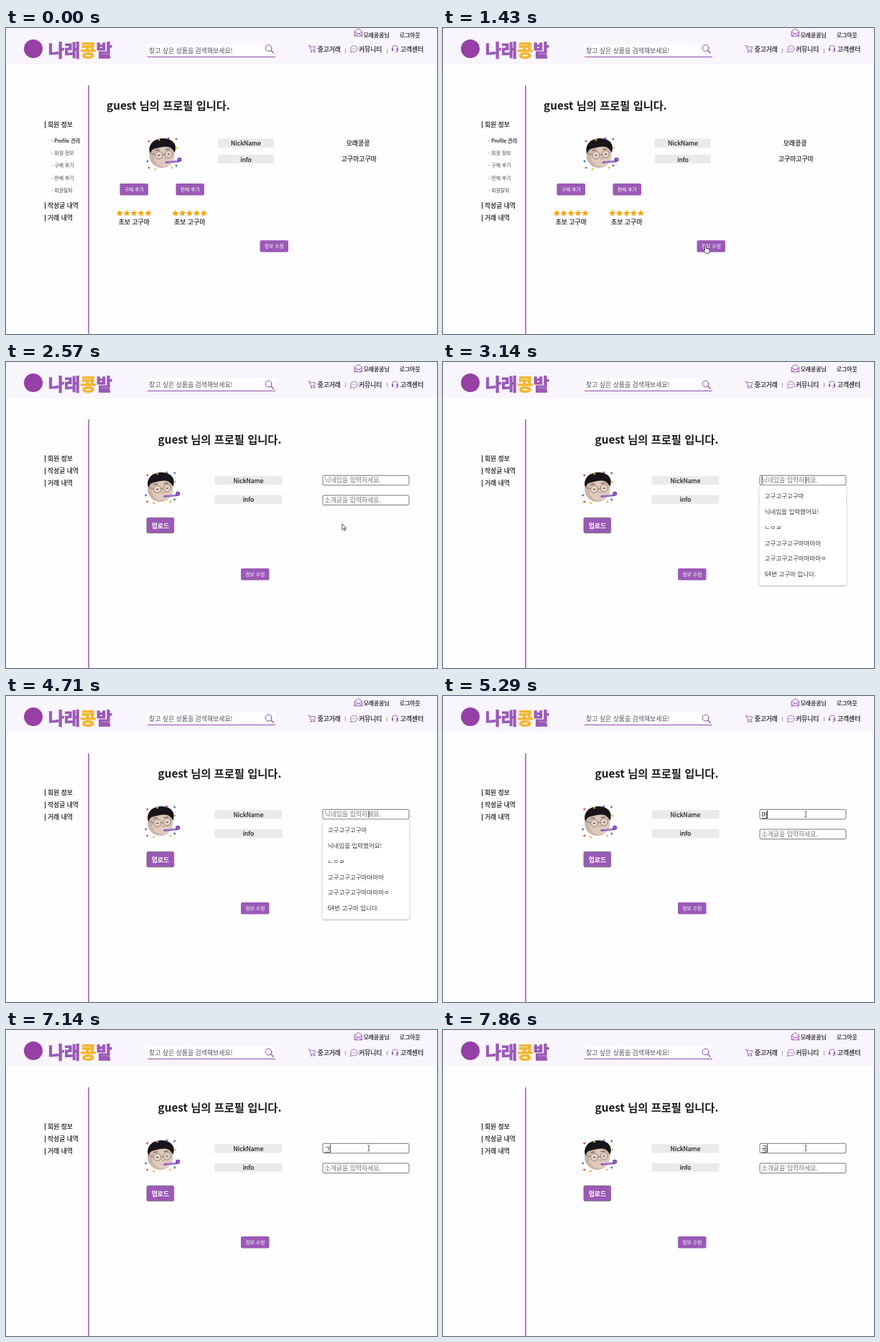
Animation, 600 px wide and 427 px high, one loop 8000 ms. Source, as an HTML page:

```html
<!DOCTYPE html>
<html lang="ko">
<head>
<meta charset="utf-8">
<style>
html, body { margin: 0; width: 100%; height: 100%; overflow: hidden; background: #fefdff; }
svg { display: block; width: 100%; height: 100%; }
text { font-family: "Noto Sans CJK KR", "Noto Sans CJK JP", "Noto Sans CJK", "Noto Sans", sans-serif; white-space: pre; }
.medium { stroke: currentColor; stroke-width: .2px; }
.heavy { stroke: currentColor; stroke-width: 1px; }
.icon { fill: none; stroke: #8e44ad; stroke-width: .75; stroke-linecap: round; stroke-linejoin: round; }
.off { display: none; }
</style>
</head>
<body>
<svg id="stage" viewBox="0 0 600 427"></svg>
<script>
const LOOP = 8000;
const PURPLE = '#9b59b6';
const INK = '#1c1b1f';

// cy is the optical middle of the line
const text = (x, cy, size, str, { fill = INK, weight = 400, anchor = 'start', look = '' } = {}) =>
  `<text x="${x}" y="${(cy + size * .37).toFixed(2)}" font-size="${size}" font-weight="${weight}" fill="${fill}" color="${fill}" text-anchor="${anchor}" class="${look}">${str}</text>`;
const rect = (x, y, w, h, fill, extra = '') =>
  `<rect x="${x}" y="${y}" width="${w}" height="${h}" fill="${fill}" ${extra}/>`;
const group = (id, body, cls = '') => `<g id="${id}" class="${cls}">${body}</g>`;
const medium = { look: 'medium' };
const middle = { anchor: 'middle', look: 'medium' };

const button = (x, y, label, id = '') =>
  rect(x, y, 39.5, 16.5, PURPLE, `rx="2" id="${id}"`) +
  text(x + 19.8, y + 8.3, 6.9, label, { fill: '#fff', anchor: 'middle' });

const label = (x, y, w, h, str, rx) =>
  rect(x, y, w, h, '#ebe9ec', `rx="${rx}"`) + text(x + w / 2, y + h / 2 + .4, 8.7, str, middle);

const menuItem = (y, str) =>
  rect(54, y - 4.6, 1, 9.6, INK) + text(58, y, 8.8, str, medium);

function star(cx, cy, r) {
  const points = Array.from({ length: 10 }, (_, i) => {
    const a = -Math.PI / 2 + i * Math.PI / 5, d = i % 2 ? r * .46 : r;
    return `${(cx + d * Math.cos(a)).toFixed(2)},${(cy + d * Math.sin(a)).toFixed(2)}`;
  });
  return `<polygon points="${points.join(' ')}" fill="#f5a50a"/>`;
}
const rating = x =>
  [0, 1, 2, 3, 4].map(i => star(x + i * 9.9, 258.5, 4.9)).join('') +
  text(x + 20, 270.3, 8.9, '초보 고구마', middle);

const CONFETTI = [
  [213, 156, '#e8b62c'], [237, 155, '#3f6fd0'], [238, 167, '#e8b62c'],
  [199, 158, '#d8453e'], [197, 186, '#3f6fd0'], [199, 195, '#d8453e'], [208, 197, '#e8b62c'],
  [237, 192, '#3f6fd0'], [231, 195, '#e8b62c'], [226, 154, '#7d48b8']
];
const avatar = dx => `<g transform="translate(${dx} 0)">
  <ellipse cx="217" cy="178" rx="17.500" ry="17" fill="#cbb4a8"/>
  <ellipse cx="220" cy="180" rx="14" ry="13.500" fill="#dfc9bd"/>
  <path d="M200.500 175C197 166 203 156 214 154.500C225 152.500 235 157 236 166C236.300 169 235.500 172 234.500 174C232 168 228 165 222 165.500C215 166 209 168 205 169C202.500 170.500 202 173 200.500 175Z" fill="#17151a"/>
  <path d="M208 171l6-1M222 169.500l6-.5" stroke="#4a3d39" stroke-width=".9"/>
  <g fill="#e4d2c6" stroke="#75695e" stroke-width=".8">
    <circle cx="213" cy="177.500" r="5.200"/><circle cx="226.500" cy="176" r="5.200"/>
    <path d="M218.200 177l3.100-.4M208 177l-7-2" fill="none"/>
  </g>
  <path d="M211.500 177.700h3M225 176.200h3" stroke="#4b3d38" stroke-width="1.300"/>
  <path d="M219 181q2 3 4 .5" fill="none" stroke="#b08a7a" stroke-width=".9"/>
  <path d="M223 187.500L240 186" stroke="#7c48c0" stroke-width="2.600" stroke-linecap="round"/>
  <path d="M225 187.200L239 185.900" stroke="#c3a1e8" stroke-width=".8"/>
  <circle cx="241.500" cy="183.800" r="3" fill="#6d3cb2"/><circle cx="241.500" cy="183.800" r="1.300" fill="#a983da"/>
  ${CONFETTI.map(([x, y, c], i) => rect(x - 1.2, y - 1.2, 2.4, 2.4, c, `transform="rotate(${i * 37} ${x} ${y})"`)).join('')}
</g>`;

const icons = group('icons', `
  <circle cx="365.500" cy="28" r="4.400" stroke-width="1"/><path d="M368.800 31.300l3.400 3.400" stroke-width="1.300"/>
  <path d="M485.500 4.700L490.500 1L495.500 4.700V11.300H485.500ZM485.500 5.600l5 3l5-3M485.500 11.300l3.700-3.300M495.500 11.300l-3.700-3.300" stroke-width=".9"/>
  <path d="M420.800 24.500h1.800l1.700 6.300h5.200l1.200-4.600h-7.700"/><circle cx="424.900" cy="33" r=".9"/><circle cx="429" cy="33" r=".9"/>
  <path d="M479.500 33.600c.8-.8 1-1.400.8-2.200a4.900 4.400 0 1 1 2.200 1.700c-1 .5-2 .6-3 .5Z"/>
  <path d="M481.500 29.300h.2M483.800 29.300h.2M486.100 29.300h.2" stroke-width="1.100"/>
  <path d="M537.700 29.300v-1a3.900 4 0 0 1 7.800 0v3.300q0 1.900-3 1.900"/>
  <path d="M537.900 28.800h.9v2.900h-.9ZM544.400 28.800h.9v2.900h-.9Z" fill="#8e44ad"/>`, 'icon');

const header = rect(0, 0, 600, 50.5, '#f8f5fd') +
  `<circle cx="38" cy="29" r="13" fill="#963fa4"/>` +
  text(58.8, 31.3, 24.2, `나래<tspan fill="#f2b731" color="#f2b731">콩</tspan>밭`, { fill: PURPLE, weight: 900, look: 'heavy' }) +
  rect(197, 22, 178, 18, '#fdfcff') + rect(197, 39.8, 178, 1, '#8e44ad') +
  text(199, 31.6, 8.9, '찾고 싶은 상품을 검색해보세요!', { fill: '#55525a' }) +
  text(497.7, 10.3, 7.8, '모래콩콩님', medium) +
  text(548, 10.3, 7.8, '로그아웃', medium) +
  group('nav',
    text(433.7, 30.2, 8.75, '중고거래', medium) +
    text(491.2, 30.2, 8.75, '커뮤니티', medium) +
    text(549, 30.2, 8.75, '고객센터', medium)) +
  rect(472, 29, .8, 6.2, '#8b8890') + rect(530, 29, .8, 6.2, '#8b8890') + icons;

const profile =
  text(140, 108.3, 15.3, 'guest 님의 프로필 입니다.', { weight: 700 }) +
  menuItem(134.7, '회원 정보') + menuItem(247.5, '작성글 내역') + menuItem(265, '거래 내역') +
  ['Profile 관리', '회원 정보', '구매 후기', '판매 후기', '회원탈퇴'].map((s, i) =>
    text(63, 157.5 + i * 17.2, 6.9, '- ' + s, i ? { fill: '#4a474e' } : medium)).join('') +
  avatar(0) +
  label(295, 154.5, 78, 12.3, 'NickName', 0) + label(295, 177, 78, 12, 'info', 0) +
  text(490, 160.5, 8.9, '모래콩콩', middle) + text(491.3, 183, 8.9, '고구마고구마', middle) +
  button(158.5, 217, '구매 후기') + button(236.5, 217, '판매 후기') +
  rating(158.3) + rating(235.7) + button(353.5, 296.3, '정보 수정', 'edit');

const inputBox = y => rect(441, y, 120, 13.6, '#fff', 'rx="2" stroke="#77747a" stroke-width="1"');

const form =
  text(297.5, 108.3, 15.3, 'guest 님의 프로필 입니다.', { weight: 700, anchor: 'middle' }) +
  menuItem(134.7, '회원 정보') + menuItem(152, '작성글 내역') + menuItem(169, '거래 내역') +
  avatar(-2.3) +
  label(290.5, 159.2, 94, 12, 'NickName', 1.5) + label(290.5, 185.7, 94, 12, 'info', 1.5) +
  rect(196, 217.3, 37.7, 21.4, PURPLE, 'rx="2" stroke="#77717c" stroke-width=".9"') +
  text(214.9, 228.3, 8.9, '업로드', { fill: '#fff', weight: 700, anchor: 'middle' }) +
  button(327, 288, '정보 수정') +
  inputBox(158.3) + inputBox(186) +
  text(443.5, 192.8, 8.9, '소개글을 입력하세요.', { fill: '#757575' }) +
  group('hint', text(443.5, 165, 8.9, '닉네임을 입력하세요.', { fill: '#757575' })) +
  `<text id="typed" x="443.500" y="168.600" font-size="8.900" fill="#111"></text>` +
  rect(443.5, 170, 8, .8, '#222', 'id="underline"') +
  rect(444, 159.3, .8, 11.4, '#111', 'id="caret"');

const suggestions = rect(440.3, 172.6, 121.4, 139, '#fff', 'rx="2.500" stroke="#dcdadf" stroke-width=".7" filter="url(#shadow)"') +
  ['고구고구고구마', '닉네임을 입력했어요!', 'ㄴㅇㄹ', '고구고구고구마마마마', '고구고구고구마마마마ㅇ', '64번 고구마 입니다.']
    .map((s, i) => text(447.8, 187.3 + i * 21.7, 8.5, s, { fill: '#3c3a40' })).join('');

const cursors =
  `<path id="arrow" class="off" d="M0 0V8.300L2 6.500L3.300 9.300L4.600 8.700L3.300 6H5.800Z" fill="#fff" stroke="#222" stroke-width=".8"/>
  <path id="hand" class="off" d="M-1 .5Q0-.5 1 .5V4.300L5.300 5.300Q6 5.700 5.800 7L5 10.800H.3L-3 6.800Q-2.500 5.600-1 7Z" fill="#fff" stroke="#222" stroke-width=".8"/>
  <path id="beam" class="off" d="M-1.600-4Q-.3-4 0-3.300Q.3-4 1.600-4M0-3.300V3.300M-1.600 4Q-.3 4 0 3.300Q.3 4 1.600 4" fill="none" stroke="#333" stroke-width=".8"/>`;

const $ = id => document.getElementById(id);
$('stage').innerHTML =
  `<defs><filter id="shadow" x="-10%" y="-10%" width="120%" height="120%"><feDropShadow dx="0" dy="1" stdDeviation="1" flood-opacity=".25"/></filter></defs>` +
  rect(0, 0, 600, 427, '#fefdff') + header + rect(114.3, 80, 1.5, 347, PURPLE) +
  group('profile', profile) + group('form', form) + group('suggestions', suggestions) + cursors;

// time, cursor shape, x, y
const POINTER = [
  [0, ''], [430, 'arrow', 565, 324], [570, 'arrow', 515, 314], [710, 'arrow', 458, 300],
  [860, 'arrow', 398, 286], [1000, 'arrow', 350, 282], [1140, 'arrow', 336, 289],
  [1290, 'arrow', 346, 298], [1430, 'hand', 365.5, 303.5], [1570, 'hand', 367, 305.5],
  [1710, 'hand', 366, 304], [2290, 'arrow', 408, 290], [2430, 'arrow', 433.5, 268.7],
  [2570, 'arrow', 468, 226], [2710, 'arrow', 495, 184], [2860, 'beam', 505, 165]
];
// time, typed text, caret shown, suggestions shown
const FIELD = [
  [0, '', 0, 0], [3000, '', 1, 0], [3140, '', 1, 1], [3570, '', 0, 1], [4140, '', 1, 1], [4710, '', 0, 1],
  [5000, 'ㅁ', 1, 1], [5150, 'ㅁ', 1, 0], [5290, '머', 1, 0], [5860, '머', 0, 0],
  [6290, 'ㅁ', 1, 0], [6430, '', 0, 0], [6570, '', 1, 0],
  [7140, 'ㄱ', 1, 0], [7290, '고', 1, 1], [7860, '곡', 1, 0]
];
const FORM_OPENS = 2570;

const at = (table, t) => table.findLast(row => row[0] <= t);
const show = (id, on) => $(id).classList.toggle('off', !on);
const move = (id, x, y) => $(id).setAttribute('transform', `translate(${x} ${y})`);

function draw() {
  const t = performance.now() % LOOP;
  const onForm = t >= FORM_OPENS;
  show('profile', !onForm);
  show('form', onForm);
  move('icons', 0, onForm ? 2.5 : 0);
  move('nav', 0, onForm ? 1.5 : 0);
  $('edit').setAttribute('fill', t >= 2000 && t < 2290 ? '#8e4ba9' : PURPLE);

  const [, shape, x, y] = at(POINTER, t);
  for (const id of ['arrow', 'hand', 'beam']) show(id, id === shape);
  if (shape) move(shape, x, y);

  const [, typed, caret, open] = at(FIELD, t);
  $('typed').textContent = typed;
  show('hint', onForm && !typed);
  show('underline', typed);
  show('caret', caret);
  $('caret').setAttribute('x', typed ? 451.3 : 443.7);
  show('suggestions', open);
  requestAnimationFrame(draw);
}
draw();
</script>
</body>
</html>
```
